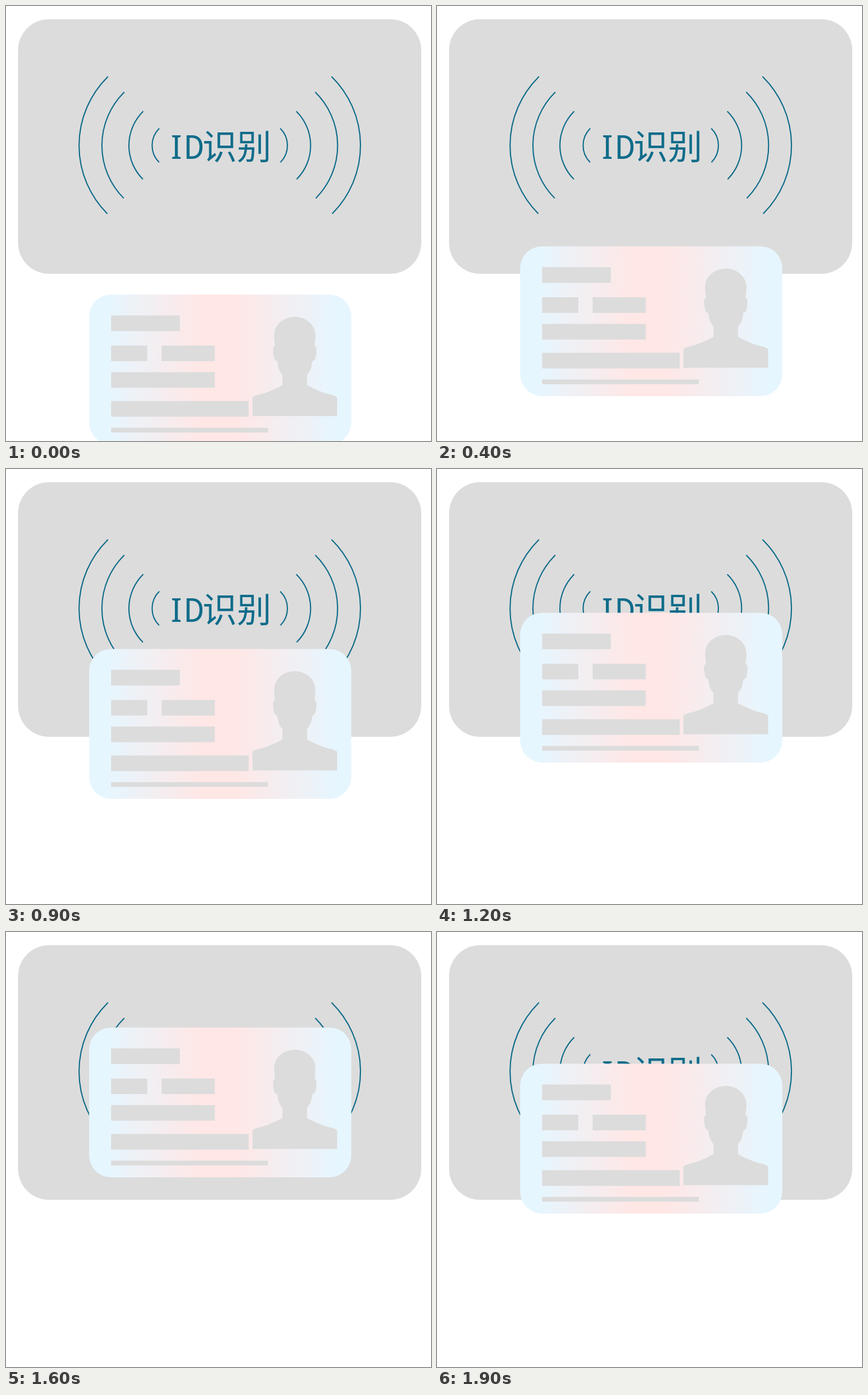
An HTML page with a canvas that plays this animation: 740 px wide and 757 px high, repeating every 2 s.

```html
<!DOCTYPE html>
<html lang="zh">
<head>
<meta charset="utf-8">
<title>ID识别</title>
<style>
  html, body { margin: 0; width: 100%; height: 100%; overflow: hidden; background: #fff; }
  canvas { display: block; }
</style>
</head>
<body>
<canvas id="stage" width="740" height="757"></canvas>
<script>
const ctx = document.getElementById('stage').getContext('2d');
const GREY = '#dcdcdc', TEAL = '#0f6c8a';
const BLUE = '#e6f6fe', PINK = '#ffe7e6';
const LOOP = 2000, STEP = 100, RISE = 21;
const CARD = { x: 144.8, y: 502.2, w: 456.4, h: 260.7, r: 38 };

const CJK = '500 60px "Noto Sans CJK SC", "Noto Sans CJK", sans-serif';
const LATIN = '500 57px "Noto Sans Mono", monospace';
const BAR = '500 57px "Noto Sans", sans-serif';

// Bars on the card: x, y from the card's top, width, height
const BARS = [
  [183, 36.3, 119.7, 27.2],
  [183, 88.7, 63, 27.2],
  [271, 88.7, 92.6, 27.2],
  [183, 135, 180.6, 27.2],
  [183, 185.3, 239.6, 27.2],
  [183, 231.7, 273, 8.3]
];

// Waves: centre x, radius
const WAVES = [[295.2, 168], [297, 130], [297.3, 83.3], [296, 41.6]];
const WAVE_AXIS = 372.2, WAVE_Y = 242.7;

function roundRect(x, y, w, h, r, fill) {
  ctx.fillStyle = fill;
  ctx.beginPath();
  ctx.roundRect(x, y, w, h, r);
  ctx.fill();
}

// Places a glyph by the centre of its ink
function glyph(ch, font, cx, cy) {
  ctx.font = font;
  const m = ctx.measureText(ch);
  const x = cx + (m.actualBoundingBoxLeft - m.actualBoundingBoxRight) / 2;
  const y = cy + (m.actualBoundingBoxAscent - m.actualBoundingBoxDescent) / 2;
  ctx.fillText(ch, x, y);
}

function drawReader() {
  roundRect(21, 23, 702, 443, 54, GREY);
  ctx.strokeStyle = TEAL;
  ctx.lineWidth = 2.1;
  for (const [cx, r] of WAVES) {
    const a = Math.PI / 4;
    ctx.beginPath();
    ctx.arc(cx, WAVE_Y, r, Math.PI - a, Math.PI + a + 0.01);
    ctx.stroke();
    ctx.beginPath();
    ctx.arc(2 * WAVE_AXIS - cx, WAVE_Y, r, -a - 0.01, a);
    ctx.stroke();
  }
  ctx.fillStyle = TEAL;
  glyph('I', BAR, 296.5, 245.5);
  glyph('D', LATIN, 328, 245.5);
  glyph('识', CJK, 371.5, 245);
  glyph('别', CJK, 430, 245);
}

// Left half of the portrait, relative to its axis and the card's top
function halfPortrait() {
  ctx.beginPath();
  ctx.moveTo(0.5, 38.5);
  ctx.lineTo(0, 38.5);
  ctx.bezierCurveTo(-19, 38.7, -36, 52, -36, 71);
  ctx.bezierCurveTo(-36, 78, -35, 83, -34.5, 89.5);
  ctx.bezierCurveTo(-39, 90, -37.8, 98, -37.2, 104);
  ctx.bezierCurveTo(-36.6, 110, -35, 115.5, -30.5, 115.8);
  ctx.bezierCurveTo(-29.5, 126, -27, 134, -21.4, 139.5);
  ctx.lineTo(-21.4, 157.8);
  ctx.bezierCurveTo(-34, 164, -48, 170.5, -58, 173);
  ctx.bezierCurveTo(-65, 174.3, -70, 176, -73.7, 178.6);
  ctx.lineTo(-73.7, 211.3);
  ctx.lineTo(0.5, 211.3);
  ctx.fill();
}

function drawCard(top) {
  const { x, w, h, r } = CARD;
  const wash = ctx.createLinearGradient(x, 0, x + w, 0);
  wash.addColorStop(0.07, BLUE);
  wash.addColorStop(0.42, PINK);
  wash.addColorStop(0.56, PINK);
  wash.addColorStop(0.94, BLUE);
  roundRect(x, top, w, h, r, wash);

  ctx.fillStyle = GREY;
  for (const [bx, by, bw, bh] of BARS) ctx.fillRect(bx, top + by, bw, bh);
  for (const side of [1, -1]) {
    ctx.save();
    ctx.translate(502.8, top);
    ctx.scale(side, 1);
    halfPortrait();
    ctx.restore();
  }
}

// The card climbs in even steps, then drops back once before the loop restarts
function cardTop(t) {
  const n = Math.floor(t / STEP);
  return CARD.y - RISE * (n < 19 ? n : 13);
}

const start = performance.now();

function frame() {
  const t = (performance.now() - start) % LOOP;
  ctx.fillStyle = '#fff';
  ctx.fillRect(0, 0, 740, 757);
  drawReader();
  drawCard(cardTop(t));
  requestAnimationFrame(frame);
}
frame();
</script>
</body>
</html>
```
